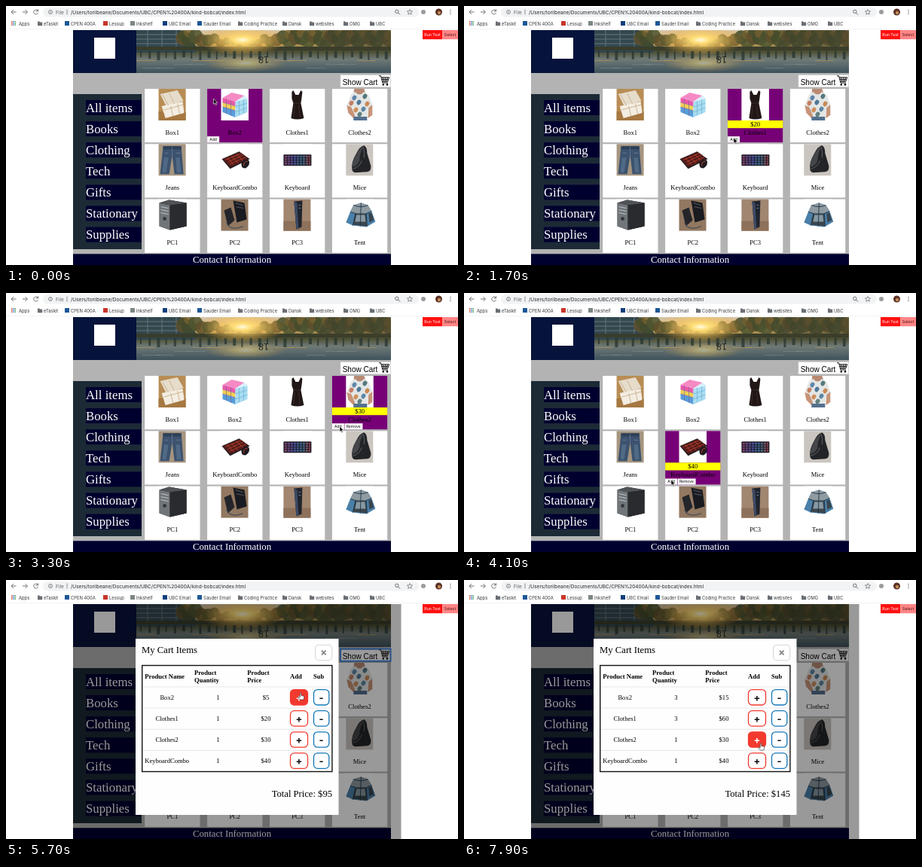
An HTML page for the animation above (8000 ms loop, 600 px wide and 344 px high).

```html
<!DOCTYPE html>
<html lang="en">
<head>
<meta charset="utf-8">
<title>Shop</title>
<style>
html, body { margin: 0; width: 100%; height: 100%; overflow: hidden; background: #fff; }
svg { display: block; width: 600px; height: 344px; }
text { white-space: pre; }
.serif { font-family: "Liberation Serif", "Times New Roman", serif; }
.sans { font-family: "Liberation Sans", Arial, sans-serif; }
.ui { font-family: Inter, Roboto, sans-serif; }
</style>
</head>
<body>
<svg viewBox="0 0 600 344">
  <defs>
    <linearGradient id="sky" x2="0" y2="1">
      <stop offset="0" stop-color="#d3c6ab"/><stop offset=".3" stop-color="#e0b468"/>
      <stop offset=".48" stop-color="#4a4a2c"/><stop offset=".68" stop-color="#6f7a76"/>
      <stop offset="1" stop-color="#3e525c"/>
    </linearGradient>
    <radialGradient id="sun">
      <stop offset="0" stop-color="#fffbe0"/><stop offset=".2" stop-color="#ffdf78"/>
      <stop offset="1" stop-color="#f2a437" stop-opacity="0"/>
    </radialGradient>
    <linearGradient id="glow">
      <stop offset="0" stop-color="#8a3f6b"/><stop offset=".35" stop-color="#4f4fa0"/>
      <stop offset=".7" stop-color="#39708c"/><stop offset="1" stop-color="#a8404c"/>
    </linearGradient>
    <clipPath id="photo"><rect x="173" y="32" width="338" height="57"/></clipPath>
  </defs>
  <g id="page"></g>
  <g id="live"></g>
</svg>
<script>
const LOOP = 8000, STEP = 100;
const NAVY = '#00002f', RED = '#f23a2f', BLUE = '#1478b8';

const rect = (x, y, w, h, fill, more = '') =>
  `<rect x="${x}" y="${y}" width="${w}" height="${h}" fill="${fill}" ${more}/>`;
const dot = (x, y, r, fill, more = '') => `<circle cx="${x}" cy="${y}" r="${r}" fill="${fill}" ${more}/>`;
const path = (d, fill, more = '') => `<path d="${d}" fill="${fill}" ${more}/>`;
const line = (d, color, w = 1) => path(d, 'none', `stroke="${color}" stroke-width="${w}"`);
const text = (x, y, s, size, cls = 'serif', more = '') =>
  `<text x="${x}" y="${y}" font-size="${size}" class="${cls}" ${more}>${s}</text>`;
const MID = 'text-anchor="middle"';

// Product pictures in a 36 x 42 box
const pics = {
  Box1: () => rect(0, 0, 36, 42, '#b88d55') + rect(0, 30, 36, 12, '#a67842') +
    path('M2 7L25 2L33 16L10 23Z', '#e6dccb') + path('M4 23L32 17L34 32L9 39Z', '#f3ede2') +
    line('M5 8L13 22M14 6L21 20M7 28L33 21M16 23L19 36M25 20L28 34', '#c3aa83', .8),
  Box2: () => path('M2 12L14 5L31 9L19 17Z', '#f58ac4') + path('M2 12L19 17V23L2 18Z', '#e85aaa') +
    path('M2 18L19 23V29L2 24Z', '#f0cf52') + path('M2 24L19 29V38L2 31Z', '#579cd8') +
    path('M19 17L35 13V31L19 38Z', '#a9dcf1') + path('M19 17L31 9L36 13Z', '#d8f0fa') +
    line('M2 18L19 23M2 24L19 29M7 13V33M13 15V36', '#7b5f9b', .6) +
    line('M19 24L35 19M19 31L35 25M24 16V35M30 14V33', '#5fa9d1', .6),
  Clothes1: () => path('M13 2L16 8H20L23 2L25 4L24 13L23 19L27 39Q18 42 10 39L13 19L11 13L11 4Z', '#211716') +
    line('M13 19H23M15 22L13 38M20 22L22 38', '#4a3430', .7),
  Clothes2: () => path('M11 0H24L26 6L18 11L10 6Z', '#b98a72') +
    path('M1 22L7 7L12 4Q18 11 24 4L30 8L35 21L30 25L28 38H9L8 24Z', '#e3e6e6') +
    path('M1 22L7 24L12 36L10 39L3 32ZM30 25L35 21L35 35L29 39Z', '#c79478') + rect(10, 37, 18, 5, '#54708f') +
    [[10, 12, '#5f86a8'], [24, 10, '#55787c'], [16, 18, '#4f7797'], [27, 20, '#c98a54'], [12, 28, '#cf8f5a'],
      [22, 27, '#5d87a5'], [17, 34, '#64807e'], [6, 19, '#c47f64']]
      .map(([x, y, c]) => path(`M${x - 2} ${y}q2 -5 5 -3t-1 6q-3 2 -4 -3Z`, c)).join(''),
  Jeans: () => rect(0, 0, 36, 42, '#a69580') + path('M6 3H30L33 40H21L18 15L14 40H2Z', '#3c526e') +
    path('M6 3H30L30 7H6Z', '#2e3f58') + line('M18 4V16M8 12H13M23 12H29', '#7188a2', .7) +
    path('M7 18L13 18L10 38H5ZM23 18H28L30 38H24Z', '#506985'),
  KeyboardCombo: () => path('M1 20L24 10L38 20L12 33Z', '#1d1a1d') + path('M2 20L24 11L36 20L12 31Z', '#511d1c') +
    line('M6 21L28 12M9 24L31 14M11 27L34 17M8 18L17 28M14 16L23 26M20 13L29 22', '#d5452c', .7) +
    path('M27 25Q31 18 37 22Q39 28 33 32Q26 33 27 25Z', '#201b20') + line('M30 29Q30 23 35 23', '#e4513a', .8),
  Keyboard: () => rect(0, 14, 37, 15, '#1e1d27', 'rx="1"') + rect(1.5, 15.5, 34, 12, 'url(#glow)') +
    line('M1 18.5H36M1 21.5H36M1 24.5H36M5 15V28M9 15V28M13 15V28M17 15V28M21 15V28M25 15V28M29 15V28M33 15V28', '#1e1d27', 1),
  Mice: () => rect(0, 0, 36, 42, '#cbc5c0') + path('M8 33Q7 24 13 14Q18 3 24 2Q28 4 28 12L33 29Q34 36 28 37L12 38Q8 37 8 33Z', '#232427') +
    path('M8 31Q9 20 16 10Q20 4 23 4Q18 13 18 22Q16 29 8 31Z', '#45464a') + line('M23 4Q25 11 24 18M9 33Q18 31 21 22', '#707175', .8),
  PC1: () => path('M1 5L14 1L37 5V36L15 41L1 36Z', '#1d1f22') + path('M1 5L15 8V41L1 36Z', '#70757a') +
    path('M15 8L37 5V36L15 41Z', '#292b2e') + path('M1 5L14 1L37 5L15 8Z', '#505357') +
    line('M3 10L13 12M3 14L13 16M3 18L13 20', '#c0c4c8', 1) + dot(8, 26, 2.3, '#303439'),
  PC2: () => rect(0, 0, 36, 42, '#927861') + path('M4 15L13 11L18 28L9 36Z', '#24252a') +
    path('M16 2L31 5L34 27L21 31Z', '#191b20') + line('M19 5L29 8M20 10L30 12M7 31Q12 43 29 36', '#4a4c56', 1.2),
  PC3: () => rect(0, 0, 36, 42, '#a18670') + rect(0, 29, 36, 13, '#8e715a') +
    path('M14 3L25 2L24 37L17 40Z', '#20242d') + path('M14 3L18 5L20 39L17 40Z', '#3c4a65') +
    line('M20 8H23M20 12H23', '#68799b', 1),
  Tent: () => path('M0 31L6 16L10 8L20 5L29 8L34 16L39 30L27 37L9 35Z', '#4a7fa8') +
    path('M6 17L10 8L20 5L29 8L34 16L26 19L13 19Z', '#8f9ba1') + path('M12 19H27L28 36L9 34Z', '#3b454d') +
    path('M14 21H25L26 30H12Z', '#8799a3') + path('M30 19L34 18L37 28L31 31Z', '#39454e') +
    line('M20 5L19 36M6 17L13 19L9 35M34 16L27 19L28 36M10 8Q20 12 29 8', '#1f3444', .9)
};
const names = Object.keys(pics);
const colX = i => 184.2 + (i % 4) * 82.9;
const rowY = i => 110 + Math.floor(i / 4) * 73.3;
const W = 73.3, H = 71.2;

function card(i, hover, body = '') {
  const x = colX(i), y = rowY(i);
  return rect(x, y, W, H, hover ? '#760076' : '#fff') +
    `<g transform="translate(${x + 18.4} ${y})">${rect(0, 0, 36.5, 42, '#fff')}${pics[names[i]]()}</g>` +
    text(x + W / 2, y + 60.5, names[i], 8.55, 'serif', MID) + body;
}

function browser() {
  const grey = '#5f6368', folder = 'folder', blue = '#1d5796';
  const marks = [
    [17, 'Apps'], [50, 'eTaskit', folder], [86, 'CPEN 400A', blue], [137, 'Lessup', '#c9352b'], [173, 'Inkshelf', '#7d8782'],
    [216, 'UBC Email', '#123f7c'], [262, 'Sauder Email', blue], [316, 'Coding Practice', folder], [375, 'Dansk', folder],
    [411, 'websites', folder], [456, 'OMG', folder], [491, 'UBC', folder]];
  let s = rect(0, 0, 600, 32, '#fff') + rect(49, 2, 499, 12.5, '#f1f3f4', 'rx="6.2"') +
    line('M13.5 8H7.5M10 5L7 8L10 11M22 8H28M25.5 5L28.5 8L25.5 11', grey, .9) +
    line('M42 6A3 3 0 1 0 42.5 9.2M42.6 4.3V7H40', grey, .9) +
    dot(59, 8, 2.5, 'none', `stroke="${grey}" stroke-width=".7"`) + line('M59 7.5V9.6M59 6.3V7M81 4.5V11.5', grey, .7) +
    text(66, 10.6, 'File', 6.5, 'ui', `fill="${grey}"`) +
    text(86, 10.6, '/Users/torilbeane/Documents/UBC/CPEN%20400A/kind-bobcat/index.html', 6.5, 'ui', 'fill="#26282b"') +
    dot(518.8, 7.3, 2.2, 'none', `stroke="${grey}" stroke-width=".9"`) + line('M520.5 9L523 11.5', grey, 1) +
    path('M536 4.5l1 2.3l2.6.2l-2 1.7l.6 2.5l-2.2-1.4l-2.2 1.4l.6-2.5l-2-1.7l2.6-.2Z', 'none', `stroke="${grey}" stroke-width=".7"`) +
    dot(554, 8, 3, '#9a9c9f') + dot(574.5, 8, 4.5, '#5b3025') + dot(575, 9, 2.2, '#c08b5a') +
    [5.5, 8, 10.5].map(y => dot(590, y, .7, grey)).join('');
  for (let k = 0; k < 9; k++)
    s += rect(7 + k % 3 * 2.2, 20 + Math.floor(k / 3) * 2.2, 1.5, 1.5, ['#d94a3c', '#4285d4', '#44a05a'][k % 3]);
  for (const [x, name, mark] of marks) {
    if (mark === folder) s += path(`M${x - 8} 20.5h2.2l.8 1h3.2v4.8h-6.2Z`, '#6b6f74');
    else if (mark) s += rect(x - 8, 20, 6, 6, mark);
    s += text(x, 25.5, name, 5.85, 'ui', 'fill="#35383c"');
  }
  return s + rect(0, 30.6, 600, .5, '#e3e4e6') + rect(553, 32, 26.3, 12.2, '#ff1010') + rect(579.3, 32, 20.7, 12.2, '#ff8585') +
    text(566, 40.2, 'Run Test', 5.2, 'ui', MID + ' fill="#fff"') + text(589.5, 40.2, 'Select', 5.2, 'ui', MID + ' fill="#411"');
}

function banner() {
  let s = rect(173, 32, 338, 57, 'url(#sky)') + path('M173 32H232L256 57L250 62H173Z', '#33474f') +
    line('M173 38H236M173 44H241M173 50H247M188 32V57M207 32V57M226 32V57', '#65767a', 1);
  for (let k = 0; k < 34; k++) {
    const x = 235 + k * 8.3, gap = Math.abs(x - 312);
    const r = Math.min(10, 3 + gap / 9);
    s += dot(x, 53 - r + Math.sin(k * 2.3) * 3, r, ['#5d4f2b', '#414a2b', '#4c542f'][k % 3], 'opacity=".85"');
    if (gap > 62) s += dot(x, 36 + Math.cos(k * 1.9) * 3, 7, k % 2 ? '#75602f' : '#474e2c', 'opacity=".8"');
  }
  s += rect(173, 54, 338, 5, '#383d2b') + path('M425 32H511V58H412Z', '#40412c', 'opacity=".5"') +
    `<ellipse cx="314" cy="45" rx="58" ry="21" fill="url(#sun)"/>` +
    `<ellipse cx="318" cy="76" rx="55" ry="12" fill="url(#sun)" opacity=".45"/>`;
  for (let k = 0; k < 30; k++)
    s += rect(178 + k * 11.2, 60, 2 + k % 3, 8 + k * 7 % 5, '#26342f', 'opacity=".75"');
  s += text(342, 64, '18', 13, 'sans', `${MID} transform="rotate(180 342 65.5)" fill="#252d2a"`);
  for (let k = 0; k < 16; k++)
    s += rect(173 + k * 67 % 310, 72 + k * 5 % 15, 25, .9, k % 3 ? '#85908a' : '#c59b52', 'opacity=".6"');
  return rect(89, 32, 84, 57, '#06133b') + rect(117, 42, 28, 28, '#fff') + `<g clip-path="url(#photo)">${s}</g>`;
}

function cartButton(focus) {
  return rect(444, 91.7, 66.5, 16, '#fff', focus ? 'stroke="#3f83dc" stroke-width="2"' : 'stroke="#d5d5d5" stroke-width=".8"') +
    text(446.7, 104.6, 'Show Cart', 10, 'sans') +
    line('M495 92.8H497.5L499.9 102H507M498 94.8H508.7L506.8 100.2H499.3M500.3 95L501.3 100M503.3 95V100M506.3 95L505 100M498.6 97.4H507.6', '#111', 1) +
    dot(500.8, 104.4, 1.3, '#111') + dot(506, 104.4, 1.3, '#111');
}

function shop() {
  const menu = ['All items', 'Books', 'Clothing', 'Tech', 'Gifts', 'Stationary', 'Supplies'];
  return rect(89, 89, 422, 241, '#b3b3b3') + rect(89, 117, 91, 206, '#1c2a36') +
    menu.map((name, k) => rect(106, 125 + k * 28.1, 74, 20, '#00002f') +
      text(106, 140.8 + k * 28.1, name, 16.8, 'serif', 'fill="#fff"')).join('') +
    names.map((_, i) => card(i)).join('') + rect(89, 329.3, 422, 14.7, NAVY) +
    text(300, 341, 'Contact Information', 12.8, 'serif', MID + ' fill="#fff"');
}

// Cart rows: product index, price, time first added, clicks on the plus button
const cart = [
  { i: 1, price: 5, added: 900, clicks: [6000, 6300] },
  { i: 2, price: 20, added: 1900, clicks: [6800, 7100] },
  { i: 3, price: 30, added: 3000, clicks: [] },
  { i: 5, price: 40, added: 4100, clicks: [] }
];
const OTHER_PRICE = 20;
const FOCUS = 4800, OPEN = 5000, SHOW_PRICE = 200;

// Pointer stops: time, x, y
const stops = [[0, 275.5, 123], [500, 276, 174], [1200, 276, 174], [1500, 358, 175], [2150, 358, 175], [2300, 432, 176],
  [2500, 443, 177], [3400, 443, 177], [3800, 275, 248], [4300, 275, 248], [4750, 479, 98], [5100, 479, 98],
  [5500, 391, 150], [6400, 391, 150], [6650, 392, 182], [7250, 392, 182], [7500, 394, 217], [8000, 394, 217]];

function pointer(t) {
  const k = Math.max(1, stops.findIndex(s => s[0] > t)), [a, x, y] = stops[k - 1], [b, x2, y2] = stops[k];
  const p = Math.max(0, (t - a) / (b - a)), e = p * p * (3 - 2 * p);
  return [x + (x2 - x) * e, y + (y2 - y) * e];
}

const inside = ([px, py], x, y, w, h) => px >= x && px <= x + w && py >= y && py <= y + h;

function hoverCard(i, t) {
  const x = colX(i), y = rowY(i), item = cart.find(c => c.i === i);
  const price = item ? item.price : OTHER_PRICE;
  let s = rect(x, y + 63.2, 16, 8, '#fff') + text(x + 8, y + 69, 'Add', 5, 'ui', MID);
  if (t >= SHOW_PRICE)
    s += rect(x, y + 42, W, 10.2, '#ffff00') + text(x + W / 2, y + 50, '$' + price, 8.55, 'serif', MID);
  if (item && t >= item.added)
    s += rect(x + 16.5, y + 63.2, 24, 8, '#fff') + text(x + 28.3, y + 69, 'Remove', 5, 'ui', MID);
  return card(i, true, s);
}

const button = (x, y, w, sign, color, on) =>
  rect(x, y - 10.2, w, 20.4, on ? color : '#fff', `rx="5" stroke="${color}" stroke-width="1.3"`) +
  text(x + w / 2, y + 4.7, sign, 13, 'ui', `${MID} font-weight="bold" fill="${on ? '#fff' : '#111'}"`);

function modal(t, at) {
  const head = (x, y, s) => text(x, y, s, 8.55, 'serif', 'font-weight="bold"');
  let total = 0;
  let s = rect(89, 32, 435.5, 312, '#000', 'opacity=".4"') + rect(172, 78, 269.5, 234, '#fefefe') +
    text(180, 97.2, 'My Cart Items', 12.7) +
    rect(410.7, 86.3, 22, 20.5, '#fff', 'rx="4.5" stroke="#d6d6d6" stroke-width="1.1"') +
    line('M419 93.7L424.6 99.3M424.6 93.7L419 99.3', '#888', 1.9) +
    head(184.3, 130.5, 'Product Name') + head(250, 125.5, 'Product') + head(250, 135.5, 'Quantity') +
    head(320.3, 125.5, 'Product') + head(320.3, 135.5, 'Price') + head(377, 130.5, 'Add') + head(408, 130.5, 'Sub');
  cart.forEach(({ i, price, clicks }, k) => {
    const y = 155.8 + k * 28.1, n = 1 + clicks.filter(c => c <= t).length;
    total += n * price;
    s += rect(181, y - 14.2, 251, .7, '#ddd') +
      [[213.7, names[i]], [281.5, n], [345, '$' + n * price]].map(([x, v]) => text(x, y + 2.9, v, 8.55, 'serif', MID)).join('') +
      button(377.5, y, 23, '+', RED, inside(at, 377, y - 10.5, 24, 21)) + button(408.5, y, 20.3, '-', BLUE, false);
  });
  return s + rect(180.7, 113.5, 252.2, 141, 'none', 'stroke="#111" stroke-width="1.4"') +
    text(433, 287.5, 'Total Price: $' + total, 12.6, 'serif', 'text-anchor="end"');
}

function cursor([x, y], hand) {
  const shape = hand
    ? 'M-.8 .5Q0 -.8 .8 .5V3.3L4.3 4.2Q5 5 4.4 7.5L3.8 9H-.8L-3.2 5.8Q-3 4.5 -1.8 5.3L-.8 6Z'
    : 'M0 0V7.4L1.7 5.9L2.9 8.7L4.1 8.2L2.9 5.4H5.2Z';
  return path(shape, hand ? '#fff' : '#000', `stroke="${hand ? '#222' : '#fff'}" stroke-width=".6" transform="translate(${x} ${y})"`);
}

function scene(t) {
  const at = pointer(t), late = pointer(t - STEP), open = t >= OPEN;
  const i = open ? -1 : names.findIndex((_, n) => inside(late, colX(n), rowY(n), W, H));
  const overPlus = open && inside(at, 377, 145, 24, 106);
  return (i < 0 ? '' : hoverCard(i, t)) + cartButton(t >= FOCUS && t < cart[0].clicks[0]) +
    (open ? modal(t, at) : '') + cursor(at, overPlus);
}

const live = document.getElementById('live');
document.getElementById('page').innerHTML = browser() + banner() + shop();
let shown = -1;
function tick() {
  const t = Math.floor(performance.now() % LOOP / STEP) * STEP;
  if (t !== shown) live.innerHTML = scene(shown = t);
  requestAnimationFrame(tick);
}
tick();
</script>
</body>
</html>
```
